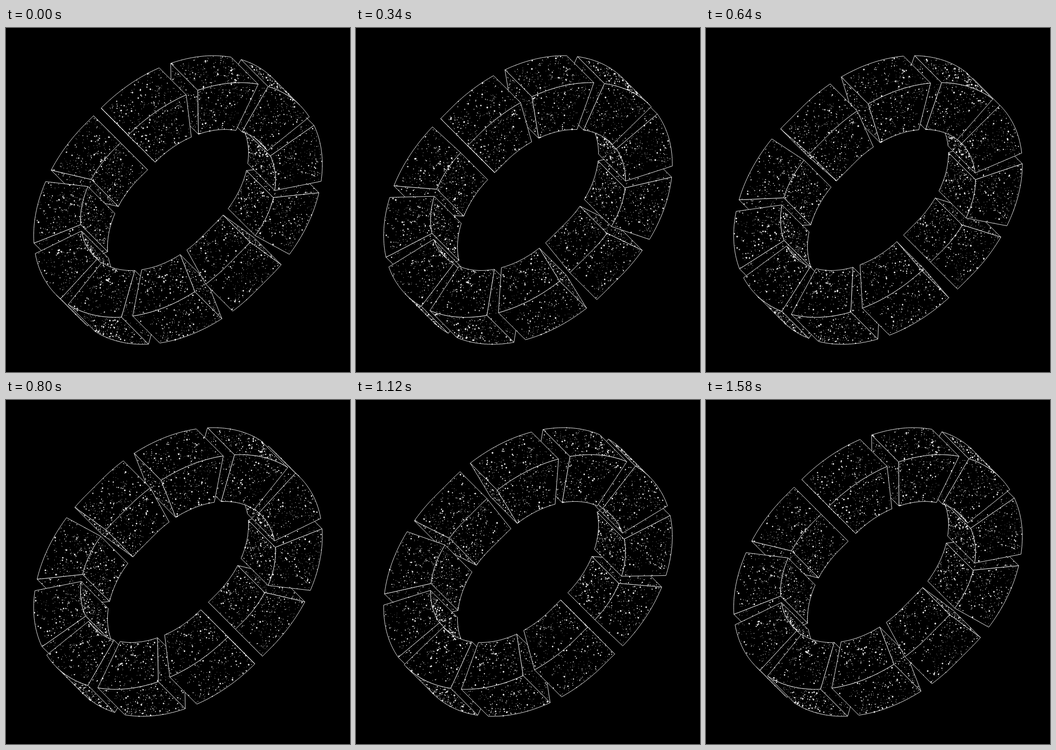
Animation of 720 by 720 pixels, one loop 1.6 s. Source, as an HTML page with a canvas:

```html
<!DOCTYPE html>
<html>
<head>
<meta charset="utf-8">
<style>
  html, body { margin: 0; width: 100%; height: 100%; overflow: hidden; background: #000; }
  canvas { display: block; }
</style>
</head>
<body>
<canvas id="stage" width="720" height="720"></canvas>
<script>
const ctx = document.getElementById('stage').getContext('2d');
const LOOP = 1600, BLOCKS = 11;
const R = 240, FLAT = 24, HALF = 40 * Math.SQRT2, TILT = Math.SQRT1_2;
const ARC = Math.PI * R, APEX = FLAT + ARC / 2;
const PITCH = 2 * (ARC + 2 * FLAT) / BLOCKS, GAP = 11.3, START = 11;

let seed = 7;
function random() {
  seed = (seed + 0x6D2B79F5) | 0;
  let x = Math.imul(seed ^ seed >>> 15, 1 | seed);
  x = x + Math.imul(x ^ x >>> 7, 61 | x) ^ x;
  return ((x ^ x >>> 14) >>> 0) / 4294967296;
}
const makeDots = count => Array.from({ length: count }, () => ({
  u: random(), v: random(), phase: random(), rate: 1 + Math.floor(random() * 7)
}));
const wallDots = [makeDots(230), makeDots(230)];
const capDots = makeDots(150);

// Point of the right half ring: s along the track, o outward, z along the axis.
function point(s, o, z) {
  const along = s - FLAT;
  const a = Math.min(Math.max(along / R, 0), Math.PI);
  const r = R + HALF * o;
  const straight = along < 0 ? along : Math.min(0, ARC - along);
  return [FLAT + straight + r * Math.sin(a), -r * Math.cos(a) * TILT + 40 * z];
}

function panel(points) {
  ctx.beginPath();
  for (const p of points) ctx.lineTo(...p);
  ctx.closePath();
  ctx.fillStyle = '#000';
  ctx.fill();
  ctx.stroke();
}

function speckle(dots, lap, place, size = 1) {
  ctx.beginPath();
  for (const d of dots) {
    const p = place(d);
    if (!p) continue;
    const x = d.rate * lap / BLOCKS + d.phase;
    const q = Math.abs(2 * (x - Math.floor(x)) - 1);
    const r = size * 0.4 / (q + 0.12) ** 0.72;
    ctx.moveTo(p[0] + r, p[1]);
    ctx.arc(p[0], p[1], r, 0, 7);
  }
  ctx.fillStyle = '#e8e8e8';
  ctx.fill();
}

// Long face of the block a..b, visible from `from` to `to`; edge(v) gives [o, z].
function wall(a, b, from, to, edge, dots, lap) {
  if (to <= from) return;
  const steps = 24, near = [], far = [];
  for (let i = 0; i <= steps; i++) {
    const s = from + (to - from) * i / steps;
    near.push(point(s, ...edge(0)));
    far.unshift(point(s, ...edge(1)));
  }
  panel(near.concat(far));
  speckle(dots, lap, d => {
    const s = a + (b - a) * d.u;
    return s >= from && s <= to && point(s, ...edge(d.v));
  });
}

function block(a, lap, side) {
  const b = a + PITCH - 2 * GAP;
  const even = wallDots[side], odd = wallDots[1 - side];
  wall(a, b, Math.max(a, APEX), b, v => [-1, 1 - 2 * v], even, lap);
  wall(a, b, a, Math.min(b, APEX), v => [1, 2 * v - 1], even, lap);
  panel([[1, -1], [1, 1], [-1, 1], [-1, -1]].map(c => point(a, ...c)));
  speckle(capDots, lap, d => point(a, 2 * d.u - 1, 2 * d.v - 1), 0.8);
  wall(a, b, a, b, v => [1 - 2 * v, 1], odd, lap);
}

// The other half is the same drawing turned by 180 degrees, half a pitch apart.
function halfRing(side, t) {
  ctx.save();
  ctx.translate(360, 360);
  ctx.rotate(-Math.PI / 4 + side * Math.PI);
  ctx.beginPath();
  ctx.rect(-0.5, -400, 500, 800);
  ctx.clip();
  for (let k = 6 + side / 2; k > -2; k--) {
    block(START + (k - t) * PITCH + GAP, k - side * BLOCKS / 2 - t, side);
  }
  ctx.restore();
}

function draw() {
  const t = performance.now() % LOOP / LOOP;
  ctx.fillStyle = '#000';
  ctx.fillRect(0, 0, 720, 720);
  ctx.strokeStyle = '#fff';
  ctx.lineWidth = 0.9;
  ctx.lineJoin = 'round';
  halfRing(0, t);
  halfRing(1, t);
  requestAnimationFrame(draw);
}
draw();
</script>
</body>
</html>
```
